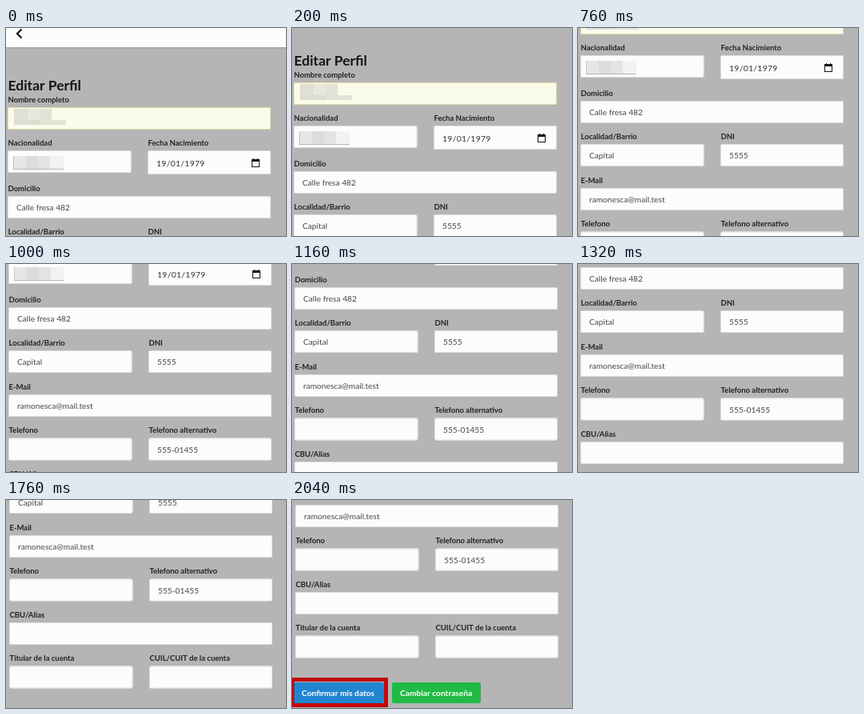
An HTML page with a canvas for the animation above (2.44 s loop, 350 by 260 pixels).

```html
<!DOCTYPE html>
<html lang="es">
<head>
<meta charset="utf-8">
<title>Editar Perfil</title>
<style>
html, body { margin: 0; width: 100%; height: 100%; overflow: hidden; background: #b5b5b5; }
canvas { display: block; width: 350px; height: 260px; }
</style>
</head>
<body>
<canvas id="stage"></canvas>
<script>
const W = 350, H = 260;
const LOOP = 2440, STEP = 40;
const SPEED = 6.25, END = 313, DRIFT = 2;
const FONT = 'Lato, "Open Sans", sans-serif';
const LEFT = 2, RIGHT = 177, FULL = 329, HALF = 154.5;

const canvas = document.getElementById('stage');
const ctx = canvas.getContext('2d');
const dpr = window.devicePixelRatio || 1;
canvas.width = W * dpr;
canvas.height = H * dpr;

function text(str, x, y, size, weight, color) {
  ctx.font = `${weight} ${size}px ${FONT}`;
  ctx.fillStyle = color;
  ctx.fillText(str, x, y);
}

function box(x, y, w, h, fill, stroke) {
  ctx.beginPath();
  ctx.roundRect(x, y, w, h, 2.5);
  ctx.fillStyle = fill;
  ctx.fill();
  if (!stroke) return;
  ctx.beginPath();
  ctx.roundRect(x + 0.5, y + 0.5, w - 1, h - 1, 2.5);
  ctx.strokeStyle = stroke;
  ctx.lineWidth = 1;
  ctx.stroke();
}

function field(label, value, x, y, w, h = 28, fill = '#fcfcfc', stroke = '#dedede') {
  text(label, x + 0.5, y - 6.5, 9.5, 700, '#222');
  box(x, y, w, h, fill, stroke);
  text(value, x + 11, y + h / 2 + 4, 10.2, 400, '#484848');
}

function blocks(list) {
  for (const [x, y, w, h, color] of list) {
    ctx.fillStyle = color;
    ctx.fillRect(x, y, w, h);
  }
}

function header() {
  blocks([[-4, 0, W + 4, 24, '#fcfcfc'], [-4, 24, W + 4, 1, '#a2a2a2'], [-4, 25, W + 4, 1, '#adadad']]);
  ctx.strokeStyle = '#111';
  ctx.lineWidth = 2.2;
  ctx.beginPath();
  ctx.moveTo(19.5, 1.5);
  ctx.lineTo(14, 7);
  ctx.lineTo(19.5, 12.5);
  ctx.stroke();
}

function calendar(x, y) {
  ctx.strokeStyle = '#111';
  ctx.lineWidth = 1;
  ctx.strokeRect(x + 0.5, y + 1.5, 9, 9);
  blocks([[x, y + 1, 10, 3, '#111'], [x + 2, y, 1, 1, '#111'], [x + 7, y, 1, 1, '#111']]);
}

function button(label, x, w, color) {
  box(x, 541, w, 26, color);
  text(label, x + 10, 557.5, 10.2, 700, '#fff');
}

function page() {
  header();
  text('Editar Perfil', 2.5, 77.5, 17.5, 700, '#151515');

  field('Nombre completo', '', LEFT, 99, FULL, 28, '#fbfbea', '#e2dda8');
  blocks([
    [10, 101, 17, 14, '#e0dfd4'], [27, 101, 15, 14, '#e8e7db'], [42, 101, 15, 14, '#e3e2d6'],
    [10, 115, 33, 6, '#dddcd2'], [43, 115, 32, 6, '#e4e3d8']
  ]);

  field('Nacionalidad', '', LEFT, 153, HALF);
  blocks([
    [9, 160, 16, 17, '#e6e6e6'], [25, 160, 15, 17, '#dcdcdc'], [40, 160, 15, 17, '#e3e3e3'],
    [55, 160, 17, 17, '#f2f2f2'], [9, 160, 1, 17, '#c4c4c4'], [9, 176, 63, 1, '#b4b4b4']
  ]);

  field('Fecha Nacimiento', '', RIGHT, 153, FULL - 175, 30);
  ctx.letterSpacing = '0.3px';
  text('19/01/1979', 188, 173, 10.4, 400, '#333');
  ctx.letterSpacing = '0px';
  calendar(307, 163);

  field('Domicilio', 'Calle fresa 482', LEFT, 210, FULL);
  field('Localidad/Barrio', 'Capital', LEFT, 264, HALF);
  field('DNI', '5555', RIGHT, 264, HALF - 0.5);
  field('E-Mail', 'ramonesca@mail.test', LEFT, 319, FULL);
  field('Telefono', '', LEFT, 373.5, HALF);
  field('Telefono alternativo', '555-01455', RIGHT, 373.5, HALF - 0.5);
  field('CBU/Alias', '', LEFT, 428, FULL);
  field('Titular de la cuenta', '', LEFT, 482.5, HALF);
  field('CUIL/CUIT de la cuenta', '', RIGHT, 482.5, HALF - 0.5);

  button('Confirmar mis datos', 0, 113, '#2185d0');
  button('Cambiar contraseña', 123, 111, '#21ba45');
  ctx.strokeStyle = '#c40808';
  ctx.lineWidth = 5;
  ctx.strokeRect(-1.5, 537.5, 117, 32);
}

function draw(time) {
  const n = Math.floor((time % LOOP) / STEP);
  const scroll = Math.min(n * SPEED, END);
  ctx.setTransform(dpr, 0, 0, dpr, 0, 0);
  ctx.fillStyle = '#b5b5b5';
  ctx.fillRect(0, 0, W, H);
  ctx.translate(Math.round(DRIFT * scroll / END), -Math.round(scroll));
  page();
}

const start = performance.now();
function tick() {
  draw(performance.now() - start);
  requestAnimationFrame(tick);
}
tick();
</script>
</body>
</html>
```
